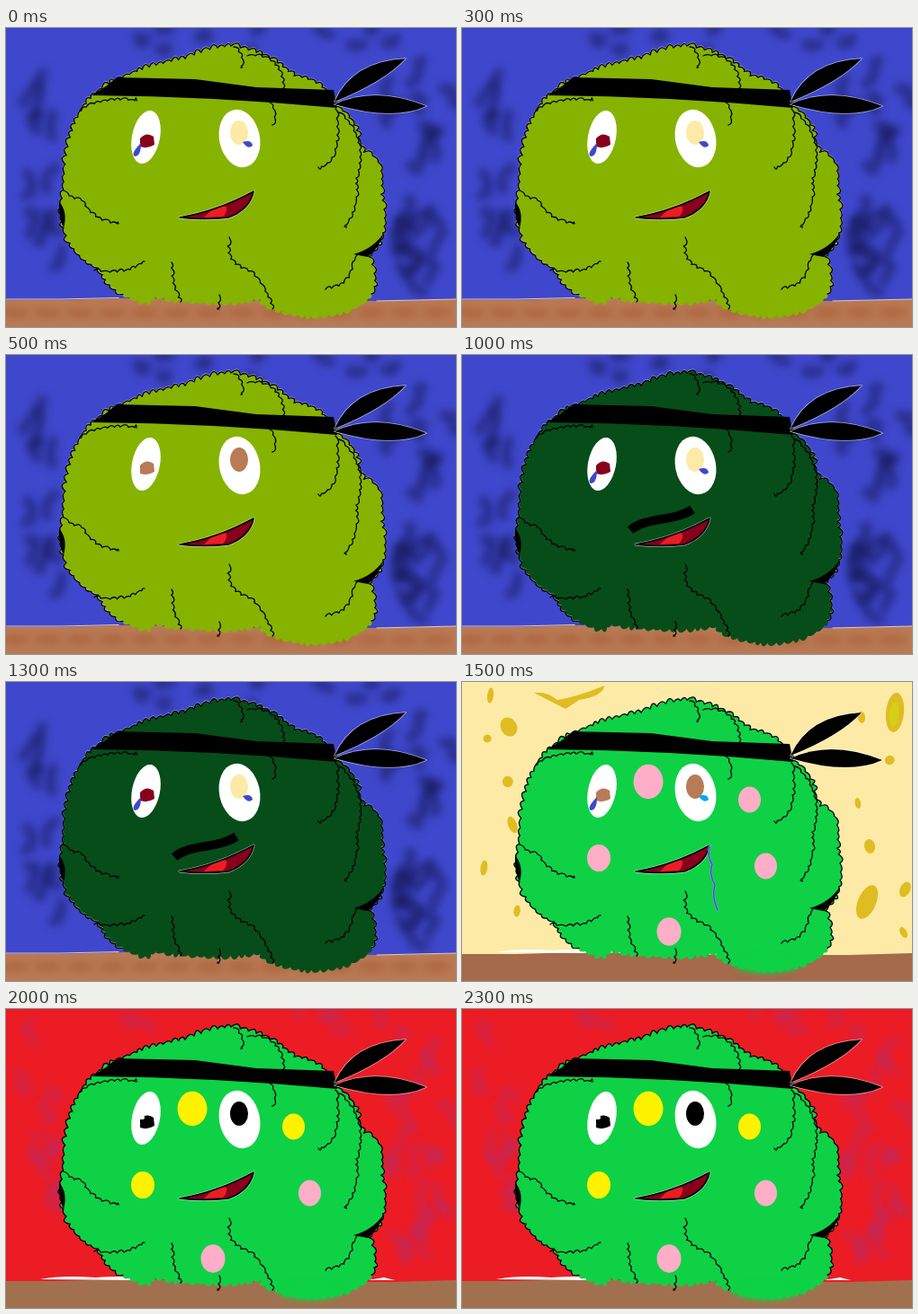
Write an HTML page with a canvas that moves like this. It is 500 px wide and 333 px high and loops after 2500 ms.

```html
<!DOCTYPE html>
<html>
<head>
<meta charset="utf-8">
<style>
html, body { margin: 0; width: 100%; height: 100%; overflow: hidden; }
canvas { display: block; }
</style>
</head>
<body>
<canvas id="stage" width="500" height="333"></canvas>
<script>
const ctx = document.getElementById('stage').getContext('2d');
const HOLD = 500;

const LIME = '#86b300', GREEN = '#0ed145', FOREST = '#064d19';
const BLUE = '#3f48cc', CREAM = '#fdeaa6', RED = '#ec1c24', GOLD = '#dfbd22';
const BROWN = '#b97a56', WINE = '#88001b', PINK = '#ffaec8', YELLOW = '#fff200';

const scenes = [
  { sky: 'night', body: LIME, pupils: [WINE, CREAM], tears: [BLUE, BLUE] },
  { sky: 'night', body: LIME, pupils: [BROWN, BROWN] },
  { sky: 'night', body: FOREST, pupils: [WINE, CREAM], tears: [BLUE, BLUE], moustache: true },
  { sky: 'cheese', body: GREEN, pupils: [BROWN, BROWN], tears: [BLUE, '#00a8f3'], drool: true,
    spots: [PINK, PINK, PINK, PINK, PINK], ground: '#a46a49' },
  { sky: 'fire', body: GREEN, pupils: ['#000', '#000'],
    spots: [YELLOW, YELLOW, YELLOW, PINK, PINK], ground: '#a1714f' }
];

// Key points of the body, clockwise from the top.
const silhouette = 'M250 20 Q295 28 318 53 Q355 58 366 87 Q391 100 394 138 Q423 140 416 183 ' +
  'Q430 232 402 252 Q420 290 396 307 Q345 334 287 308 L283 301 Q225 311 166 299 L158 306 ' +
  'Q112 296 105 268 Q75 257 64 223 Q59 205 64 180 Q66 90 111 65 Q150 42 200 34 Q225 22 250 20';

const curls = [
  'M268 31 Q305 28 308 67',
  'M253 21 Q266 32 261 44',
  'M293 83 Q302 95 296 108',
  'M366 90 Q374 150 347 155',
  'M370 94 Q404 125 388 170 Q394 195 376 221',
  'M64 181 Q72 191 84 192 Q97 217 125 218',
  'M98 270 Q135 277 154 260',
  'M184 261 Q182 285 194 305',
  'M248 233 Q240 262 270 271 Q286 282 296 313',
  'M237 297 L235 313',
  'M82 92 Q105 77 145 81',
  'M355 291 Q385 288 386 262 Q390 250 406 249'
];

function seeded(seed) {
  let s = seed * 99991;
  return () => (s = (s * 16807) % 2147483647) / 2147483647;
}

function fill(color, path) { ctx.fillStyle = color; ctx.fill(new Path2D(path)); }

function stroke(color, width, path) {
  ctx.strokeStyle = color;
  ctx.lineWidth = width;
  ctx.stroke(new Path2D(path));
}

function oval(x, y, rx, ry, color, tilt = 0) {
  ctx.beginPath();
  ctx.ellipse(x, y, rx, ry, tilt, 0, 7);
  ctx.fillStyle = color;
  ctx.fill();
}

function blurred(radius, draw) {
  ctx.filter = `blur(${radius}px)`;
  draw();
  ctx.filter = 'none';
}

// Uneven row of scallops bulging to the left of a path.
function frill(d, height, seed) {
  const guide = document.createElementNS('http://www.w3.org/2000/svg', 'path');
  guide.setAttribute('d', d);
  const rand = seeded(seed), total = guide.getTotalLength(), result = new Path2D();
  let at = 0, from = guide.getPointAtLength(0);
  result.moveTo(from.x, from.y);
  while (at < total) {
    at = Math.min(total, at + 6 + rand() * 5);
    const to = guide.getPointAtLength(at), dx = to.x - from.x, dy = to.y - from.y;
    const bulge = height * (0.5 + rand()) / (Math.hypot(dx, dy) || 1);
    result.quadraticCurveTo(from.x + dx * 0.7 + dy * bulge, from.y + dy * 0.7 - dx * bulge, to.x, to.y);
    from = to;
  }
  return result;
}

const bodyShape = frill(silhouette, 6, 5);
const curlShapes = curls.map((d, i) => frill(d, 4, i + 2));

// Soft wandering brush marks down both sides and along the top.
function smears(color, width, seed) {
  const rand = seeded(seed);
  blurred(5, () => {
    for (let i = 0; i < 40; i++) {
      const zone = i % 4;
      let x = zone === 0 ? 10 + rand() * 55 : zone === 1 ? 110 + rand() * 340 : 425 + rand() * 65;
      let y = zone === 1 ? rand() * 24 : 15 + rand() * 250;
      let d = `M${x} ${y}`;
      for (let k = 0; k < 3; k++) {
        x += (rand() - 0.5) * 26;
        y += zone === 1 ? (rand() - 0.5) * 12 : rand() * 16;
        d += ` L${x} ${y}`;
      }
      stroke(color, width, d);
    }
  });
}

function backdrop(color) {
  ctx.fillStyle = color;
  ctx.fillRect(0, 0, 500, 333);
}

const skies = {
  night() {
    backdrop(BLUE);
    smears('rgba(20,22,80,.5)', 11, 8);
  },
  cheese() {
    backdrop(CREAM);
    const rand = seeded(12);
    for (let i = 0; i < 12; i++) {
      const x = i % 2 ? 435 + rand() * 60 : 12 + rand() * 50;
      oval(x, 15 + i * 24, 3 + rand() * 3, 4 + rand() * 6, GOLD, rand() - 0.5);
    }
    fill(GOLD, 'M80 12 Q94 10 106 20 Q130 16 158 4 Q158 15 130 20 L115 30 Z');
    oval(52, 50, 9, 11, GOLD, -0.5);
    oval(481, 34, 10, 22, GOLD, 0.1);
    oval(480, 36, 5, 14, '#d6cf18', 0.1);
    oval(450, 245, 10, 20, GOLD, 0.4);
  },
  fire() {
    backdrop(RED);
    smears('rgba(168,50,130,.4)', 8, 21);
  }
};

function drawGround({ ground, sky }) {
  fill(ground || BROWN, 'M0 303 H60 L130 301 L300 304 H430 L500 302 V333 H0 Z');
  if (ground) {
    fill('#fff', 'M38 301 Q60 296 100 299 Q142 296 142 302 Z');
    if (sky === 'fire') fill('#fff', 'M402 302 L420 299 L432 302 Z');
    return;
  }
  blurred(5, () => {
    for (let x = 10; x < 500; x += 36) oval(x, 317, 16, 6, 'rgba(160,82,38,.45)');
  });
  stroke('#e8c9b4', 1, 'M0 302 H60 L125 300.5 M412 304 L500 302');
}

function drawBody({ body, ground }) {
  fill(body, bodyShape);
  ctx.save();
  ctx.beginPath();
  ctx.rect(0, 0, 500, 297);
  ctx.clip();
  if (!ground) {
    ctx.translate(0, -0.8);
    stroke('rgba(255,255,255,.45)', 1.2, bodyShape);
    ctx.translate(0, 0.8);
  }
  stroke('#000', 1.3, bodyShape);
  ctx.restore();
  for (const curl of curlShapes) stroke('#000', 1.3, curl);
  fill('#000', 'M59 193 Q69 205 64 223 Q58 210 59 193 M386 252 Q408 246 420 228 Q414 246 402 255 Z');
  if (ground) blurred(3, () => oval(338, 315, 35, 9, body));
}

function drawHeadband() {
  fill('#000', 'M95 75 L111 65 L123 55 L210 57 L278 66 L364 69 L368 89 Q230 76 95 75');
  const tails = ['M365 82 Q385 37 444 34 Q420 60 365 82', 'M365 85 Q410 64 467 87 Q430 104 365 85'];
  for (const tail of tails) {
    stroke('rgba(255,255,255,.6)', 1.6, tail);
    fill('#000', tail);
  }
}

function drawEyes({ pupils, tears, sky }) {
  oval(155.5, 121.5, 15.5, 30, '#fff', 0.2);
  oval(259.5, 123, 22.5, 32.5, '#fff', -0.2);
  fill(pupils[0], 'M149 123 Q156 115 164 121 L165 130 Q157 135 149 132 Z');
  oval(259, 116.5, 10, 13.5, pupils[1]);
  if (sky === 'fire') oval(151, 121, 3, 2, '#fff');
  if (tears) {
    fill(tears[0], 'M150 128 Q150 143 143 143 Q138 140 150 128');
    fill(tears[1], 'M263 127 Q273 124 274 131 Q269 136 263 127');
  }
}

function drawMouth({ moustache, drool }) {
  const lips = 'M193 211 Q235 204 275 182 Q271 202 247 211 Q220 214 193 211 Z';
  stroke('rgba(255,255,255,.6)', 3, lips);
  fill(WINE, lips);
  fill(RED, 'M220 211 Q234 195 245 199 Q246 206 241 210 Z');
  stroke('#000', 1.6, lips);
  if (moustache) {
    ctx.lineCap = 'butt';
    stroke('#000', 10, 'M187 195 C205 180 235 186 256 172');
  }
  if (drool) {
    const trail = 'M275 183 Q272 194 278 203 Q274 213 281 226 Q277 238 284 254';
    stroke('#8c9be0', 2.6, trail);
    stroke(BLUE, 1.3, trail);
  }
}

function drawSpots({ spots = [] }) {
  const places = [[207, 111, 16.5], [319.5, 131, 12.5], [152, 196, 13], [337.5, 205, 12.5], [230, 278, 13.5]];
  spots.forEach((color, i) => {
    const [x, y, r] = places[i];
    oval(x, y, r, r * 1.16, color);
  });
}

function drawScene(scene) {
  ctx.lineCap = ctx.lineJoin = 'round';
  skies[scene.sky]();
  for (const layer of [drawGround, drawBody, drawHeadband, drawSpots, drawEyes, drawMouth]) layer(scene);
}

let shown = -1;
function tick() {
  const index = Math.floor(performance.now() / HOLD) % scenes.length;
  if (index !== shown) drawScene(scenes[shown = index]);
  requestAnimationFrame(tick);
}
tick();
</script>
</body>
</html>
```
